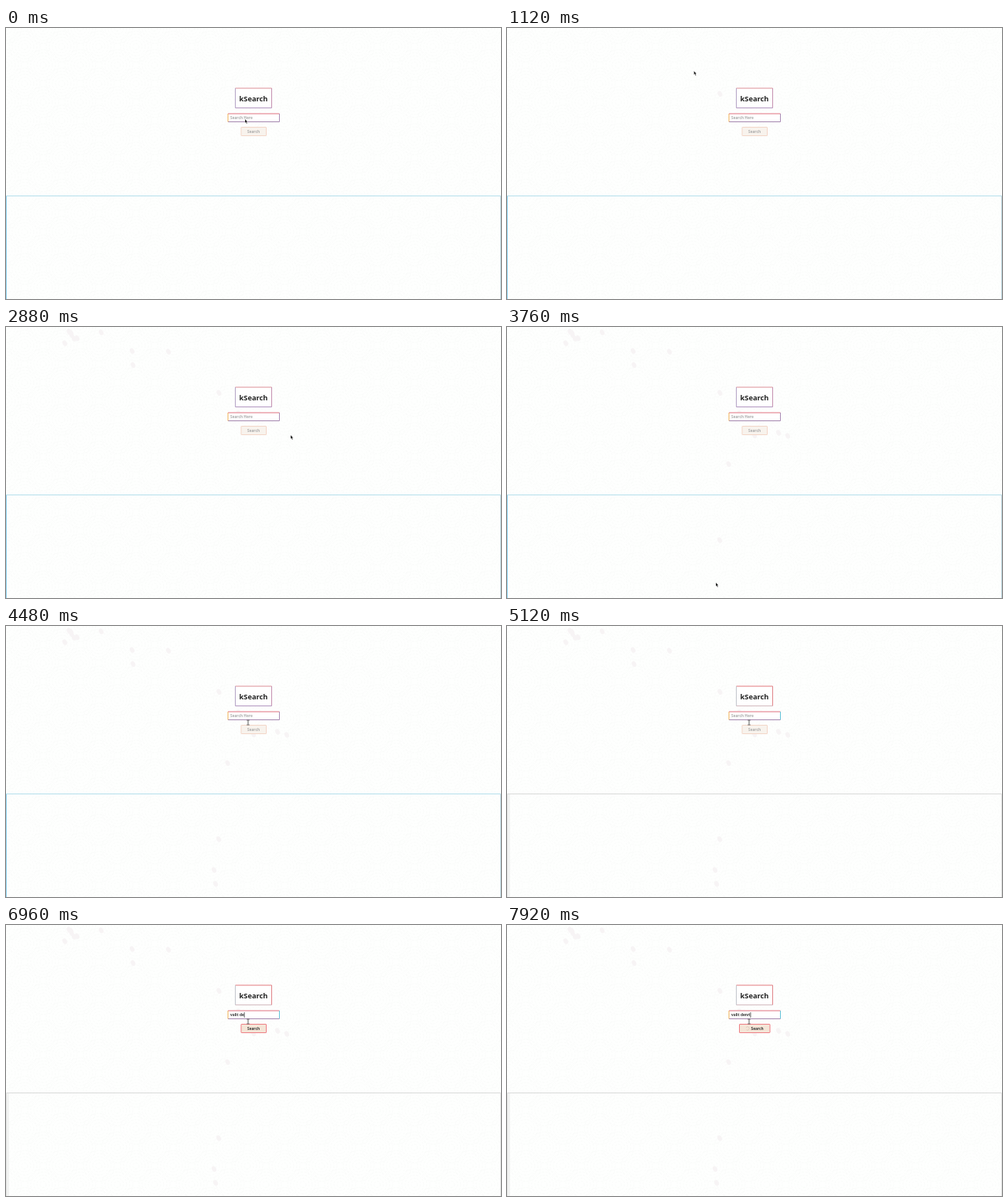
Write an HTML page that moves like this. It is 640 px wide and 351 px high and loops after 8000 ms.

```html
<!DOCTYPE html>
<html lang="en">
<head>
<meta charset="utf-8">
<title>kSearch</title>
<style>
  html, body { margin: 0; width: 100%; height: 100%; overflow: hidden; background: #fefffe; }
  svg { display: block; }
  text { font: 700 4.8px "Open Sans", "Noto Sans", sans-serif; fill: #aaa; white-space: pre; }
  text.title { font-size: 9.3px; fill: #222; }
  path, line { fill: none; }
  .ready text { fill: #333; }
  #button { fill: #f8f3ed; stroke: #f3d6c8; }
  .ready #button { fill: #f4e5d7; stroke: #ee7f86; }
  #smudges ellipse { fill: #f7f4f5; }
</style>
</head>
<body>
<svg width="640" height="351" viewBox="0 0 640 351">
  <defs>
    <pattern id="waves" width="48" height="48" patternUnits="userSpaceOnUse">
      <g id="rings" fill="none" stroke="#f9faf9" stroke-width=".8" stroke-dasharray="3 1.5"></g>
    </pattern>
  </defs>
  <rect width="640" height="351" fill="url(#waves)"/>
  <g id="smudges"></g>

  <rect id="shade" y="218" width="4" height="133" fill="#f2f3f2"/>
  <g id="results"></g>

  <rect x="296" y="77.5" width="48" height="26" fill="#fff"/>
  <g id="titleBox"></g>
  <text class="title" x="320" y="94.5" text-anchor="middle">kSearch</text>

  <rect x="287" y="110.5" width="67" height="11.5" fill="#fff"/>
  <g id="field"></g>
  <g id="form">
    <text id="query" x="290" y="118"></text>
    <rect id="button" y="128.5" height="11" rx=".5"/>
    <text id="label" y="136.1">Search</text>
  </g>
  <line id="caret" y1="113" y2="120" stroke="#222" stroke-width=".7"/>
  <circle id="spinner" cx="311" cy="134" r="2.2" fill="none" stroke="#dccbbb" stroke-width=".7" stroke-dasharray="10 4"/>

  <path id="arrow" d="M-1-3V1.8L.1.9 1 3 1.9 2.6 1 .6H2.5Z" style="fill:#111" stroke="#fff" stroke-width=".3"/>
  <path id="ibeam" d="M-1.7-3H-.5L0-2.6.5-3H1.7M0-2.6V2.6M-1.7 3H-.5L0 2.6.5 3H1.7" stroke="#333" stroke-width=".8"/>
</svg>
<script>
const LOOP = 8000, STEP = 80;
const IBEAM = 4400, FOCUS = 4720, LOADING = 7600;
const BLINK = 400;
const QUERY = "valit denri", TYPING = 5680, PER_KEY = 176;
const SMUDGE_START = 1040, SMUDGE_END = 3920, SMUDGE_EVERY = 160;

// Key points of the pointer's route: time, x, y.
const route = [
  [0, 310, 121], [480, 320, 92], [960, 308, 112], [1200, 210, 32], [1360, 163, 31],
  [1520, 123, 7], [1680, 76, 21], [1840, 88, 15], [2240, 80, 4], [2560, 96, 18],
  [2880, 369, 143], [3200, 345, 135], [3360, 295, 146], [3520, 278, 209],
  [3680, 272, 343], [3920, 269, 316], [4480, 313, 125]
];

const $ = id => document.getElementById(id);

function set(node, attrs) {
  for (const name in attrs) node.setAttribute(name, attrs[name]);
}

function add(parent, tag, attrs) {
  const node = document.createElementNS("http://www.w3.org/2000/svg", tag);
  set(node, attrs);
  parent.append(node);
  return node;
}

function show(node, visible) {
  node.style.display = visible ? "" : "none";
}

// Four sides in the order top, right, bottom, left.
function frame(parent, x1, y1, x2, y2) {
  return [[x1, y1, x2, y1], [x2, y1, x2, y2], [x1, y2, x2, y2], [x1, y1, x1, y2]]
    .map(([a, b, c, d]) => add(parent, "line", { x1: a, y1: b, x2: c, y2: d }));
}

function paint(sides, colors) {
  sides.forEach((side, i) => set(side, { stroke: colors[i] }));
}

function pointerAt(t) {
  const i = route.findIndex(p => p[0] > t);
  if (i < 0) return route.at(-1).slice(1);
  const [t0, x0, y0] = route[i - 1], [t1, x1, y1] = route[i];
  const k = (t - t0) / (t1 - t0);
  return [x0 + (x1 - x0) * k, y0 + (y1 - y0) * k];
}

for (const [cx, cy] of [[0, 0], [48, 0], [0, 48], [48, 48], [24, 24]])
  for (let r = 4; r <= 20; r += 4) add($("rings"), "circle", { cx, cy, r });

// The pointer leaves a faint smudge behind at a steady pace.
const smudges = [];
for (let time = SMUDGE_START; time <= SMUDGE_END; time += SMUDGE_EVERY) {
  const [cx, cy] = pointerAt(time);
  const node = add($("smudges"), "ellipse", {
    cx, cy, rx: 2.8, ry: 3.9, transform: `rotate(-25 ${cx} ${cy})`
  });
  smudges.push({ time, node });
}

const resultSides = frame($("results"), 0.5, 217.5, 639.5, 352);
const titleSides = frame($("titleBox"), 296.5, 78, 343.5, 103.5);
const fieldSides = frame($("field"), 287, 111, 353.5, 121.5);

function draw(t) {
  const focused = t >= FOCUS, loading = t >= LOADING;
  const typed = Math.max(0, Math.floor((t - TYPING) / PER_KEY) + 1);
  const ready = typed > 0;

  const [x, y] = pointerAt(t);
  for (const id of ["arrow", "ibeam"]) {
    set($(id), { transform: `translate(${x} ${y})` });
    show($(id), (id === "ibeam") === (t >= IBEAM));
  }
  smudges.forEach(s => show(s.node, t > s.time));

  show($("shade"), focused);
  paint(resultSides, focused
    ? ["#d9dad9", "#e2e3e2", "#ddd", "#e4e5e4"]
    : ["#b5dfec", "#b9d3dc", "#b5dfec", "#8fd3f0"]);
  paint(titleSides, focused
    ? ["#e2787c", "#e08488", "#d3b9bf", "#c3c6cc"]
    : ["#dc8f96", "#c490b0", "#b296c0", "#b4a4c6"]);
  paint(fieldSides, ["#e0707f", focused ? "#62c3d8" : "#a98cb4", "#a486ae", "#f0b055"]);

  $("form").classList.toggle("ready", ready);
  const query = $("query");
  query.textContent = ready ? QUERY.slice(0, typed) : "Search Here";

  const caretX = 290.4 + (ready ? query.getComputedTextLength() : 0);
  set($("caret"), { x1: caretX, x2: caretX });
  show($("caret"), focused && (ready || Math.floor((t - FOCUS) / BLINK) % 2 === 0));

  set($("button"), { x: loading ? 300.5 : 304, width: loading ? 39.5 : 32.5 });
  set($("label"), { x: loading ? 315.5 : 312 });
  show($("spinner"), loading);
  set($("spinner"), { transform: `rotate(${t * 0.48} 311 134)` });
}

function tick() {
  const t = performance.now() % LOOP;
  draw(Math.floor(t / STEP) * STEP);
  requestAnimationFrame(tick);
}
tick();
</script>
</body>
</html>
```
